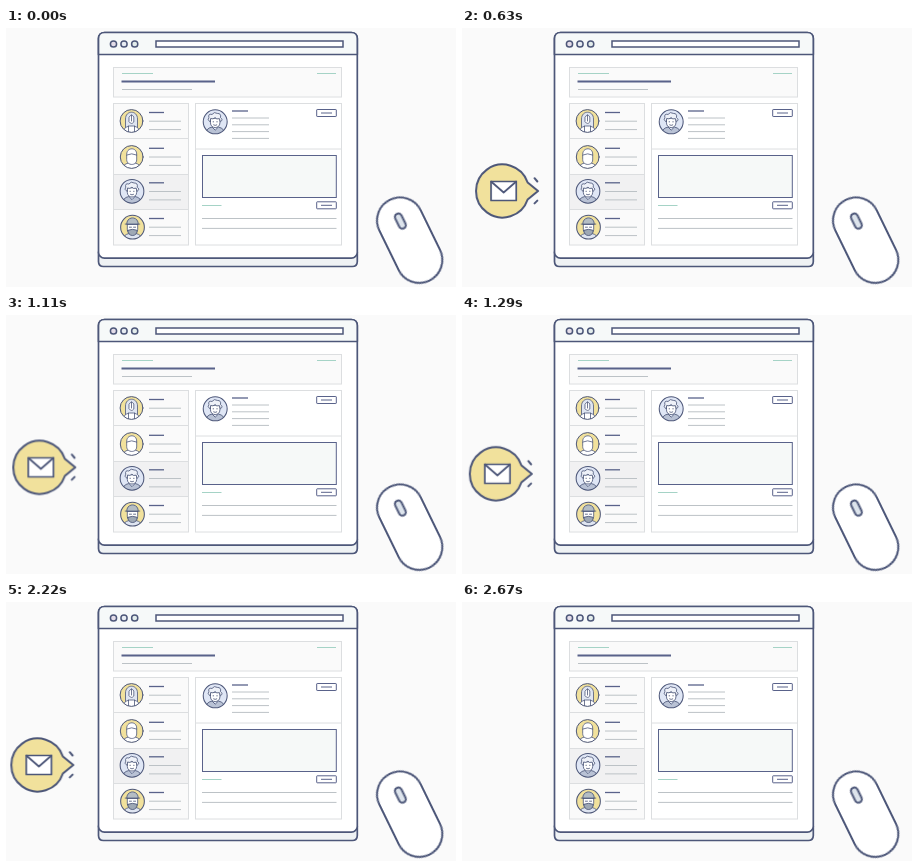
Write an HTML page that moves like this. It is 450 px wide and 259 px high and loops after 3.6 s.

```html
<!DOCTYPE html>
<html lang="en">
<head>
<meta charset="utf-8">
<title>Mail from the browser</title>
<style>
  html, body { margin: 0; width: 100%; height: 100%; overflow: hidden; background: #fafafa; }
  svg { display: block; width: 100%; height: 100%; }
  .ink { stroke: #4d5779; stroke-linecap: round; stroke-linejoin: round; }
  .edge { stroke: #dcdee0; stroke-width: 1; }
  .dark { stroke: #59628a; }
  .grey { stroke: #bcc2c6; }
  .green { stroke: #a5d3c6; }
</style>
</head>
<body>
<svg viewBox="0 0 450 259" fill="none">
  <defs>
    <clipPath id="disc"><circle r="11.4"/></clipPath>

    <g id="longHair" class="ink" stroke-width=".8">
      <path d="M-6 12V-2C-6-11 6-11 6-2V12Z" fill="#dfe5f1"/>
      <path d="M-10 13Q-8 6-2 5H2Q8 6 10 13Z" fill="#fff"/>
      <path d="M-2.3-4Q0-8 2.3-4V1Q0 4-2.3 1Z" fill="#fff"/>
      <path d="M0-6V0M-3 5V11M3 5V11"/>
    </g>

    <g id="bald" class="ink" stroke-width=".8">
      <path d="M-10 13Q-9 7-3 6H3Q9 7 10 13Z" fill="#fff"/>
      <path d="M-5-3C-5-10 5-10 5-3V3C5 9-5 9-5 3Z" fill="#fff"/>
      <path d="M-5-2Q0-4.500 5-2"/>
    </g>

    <g id="curly" class="ink" stroke-width=".8">
      <path d="M-10 13Q-9 6-3 5L0 8 3 5Q9 6 10 13Z" fill="#b9c2d5"/>
      <path d="M-4.500-3V1C-4.500 7 4.500 7 4.500 1V-3Z" fill="#fff"/>
      <path d="M-5 0Q-8-2-6-4Q-7-8-3-7Q-1-10 2-8Q6-8 5-4Q8-2 5 0L4-3Q1-2 0-4Q-2-2-4-3Z" fill="#eef1f8"/>
      <path d="M-2 0H-1.500M1.500 0H2M-1.500 3Q0 4 1.500 3"/>
    </g>

    <g id="hat" class="ink" stroke-width=".8">
      <path d="M-10 13Q-9 7-3 6H3Q9 7 10 13Z" fill="#dfe5f1"/>
      <path d="M-5-3V2C-5 9 5 9 5 2V-3Z" fill="#fff"/>
      <path d="M-5.500-3C-6-11 6-11 5.500-3Z" fill="#b4bdc4"/>
      <path d="M-7-3H7"/>
      <path d="M-4.500 3Q0 1 4.500 3Q4 8 0 8Q-4 8-4.500 3Z" fill="#9ea8b5"/>
      <path d="M-3 0H-1M1 0H3"/>
    </g>
  </defs>

  <g id="slide"><g id="hop" class="ink" stroke-width="2">
    <path d="M58.600 154.500L69 163 58.600 171.500A26.500 26.500 0 1 1 58.600 154.500Z" fill="#f1e19c"/>
    <rect x="22" y="153.500" width="25.200" height="19" fill="#fff" stroke-width="1.700"/>
    <path d="M22 153.500L34.600 164.500 47.200 153.500" stroke-width="1.700"/>
    <path d="M65.500 150.200L68.300 153.500M68.300 172.600L65.500 175.400"/>
  </g></g>

  <g class="ink" stroke-width="1.700">
    <path d="M92.500 224V233.500Q92.500 238.500 97.500 238.500H346.300Q351.300 238.500 351.300 233.500V224Z" fill="#eff2f4"/>
    <rect x="92.500" y="4.500" width="258.800" height="225.700" rx="6" fill="#fff"/>
    <path d="M92.500 26.500V10.500Q92.500 4.500 98.500 4.500H345.300Q351.300 4.500 351.300 10.500V26.500Z" fill="#f6f9f9"/>
    <circle cx="107.500" cy="16" r="3.100" fill="#e4dde9" stroke-width="1.500"/>
    <circle cx="118" cy="16" r="3.100" fill="#e8edf3" stroke-width="1.500"/>
    <circle cx="128.700" cy="16" r="3.100" fill="#e3edec" stroke-width="1.500"/>
    <rect x="150" y="13" width="187" height="6" fill="#fff" stroke-width="1.500" stroke-linejoin="miter"/>
  </g>

  <g class="edge">
    <rect x="107.500" y="39.500" width="228" height="29.500" fill="#fafafa"/>
    <rect x="107.500" y="75.500" width="75" height="141.500" fill="#fafafa"/>
    <rect x="107.500" y="146.500" width="75" height="35" fill="#f1f1f2"/>
    <path d="M107.500 110.500H182.500"/>
    <rect x="189.500" y="75.500" width="146" height="141.500" fill="#fff"/>
    <path d="M189.500 121H335.500"/>
  </g>
  <g class="dark">
    <rect x="196.500" y="127.500" width="133.800" height="42" fill="#f6f9f8"/>
    <rect x="310.700" y="81.500" width="19.600" height="7" rx=".5" fill="#fff"/>
    <rect x="310.700" y="173.800" width="19.600" height="7" rx=".5" fill="#fff"/>
  </g>
  <g id="lines"></g>
  <g id="people"></g>

  <g id="mouse"><g class="ink" stroke-width="2" transform="translate(403.700 212.200) rotate(-26)">
    <rect x="-23" y="-45" width="46" height="90" rx="23" fill="#fff"/>
    <rect x="-3.500" y="-29.200" width="7" height="16" rx="3.500" fill="#dde4ec"/>
  </g></g>
</svg>
<script>
  const LOOP = 3600;
  const byId = id => document.getElementById(id);

  function add(parent, tag, attrs) {
    const el = document.createElementNS('http://www.w3.org/2000/svg', tag);
    for (const key in attrs) el.setAttribute(key, attrs[key]);
    return parent.appendChild(el);
  }

  function line(kind, x1, x2, y, width = 1) {
    add(byId('lines'), 'path', { class: kind, d: `M${x1} ${y}H${x2}`, 'stroke-width': width });
  }

  function avatar(look, x, y, fill, size = 1) {
    const g = add(byId('people'), 'g', { transform: `translate(${x} ${y}) scale(${size})` });
    add(g, 'circle', { r: 11.4, fill });
    const clip = add(g, 'g', { 'clip-path': 'url(#disc)' });
    add(clip, 'use', { href: '#' + look });
    add(g, 'circle', { r: 11.4, class: 'ink', 'stroke-width': 1 });
  }

  line('green', 116, 147, 45.5);
  line('dark', 115.5, 209, 53.5, 2);
  line('grey', 116, 186, 61.5);
  line('green', 311, 330, 45.5);

  for (const y of [84.5, 120.3, 154.8, 190.5]) {
    line('dark', 143, 158, y, 1.3);
    line('grey', 143, 175, y + 8.7);
    line('grey', 143, 175, y + 17.1);
  }
  line('dark', 226, 242, 83, 1.3);
  for (const y of [90, 96.8, 103.6, 110.4]) line('grey', 226, 263, y);
  line('dark', 315, 326, 85);
  line('dark', 315, 326, 177.3);
  line('green', 196, 215.5, 177.5);
  line('grey', 196, 330.5, 190.5);
  line('grey', 196, 330.5, 200.4);

  const yellow = '#f1e19c', blue = '#dfe6f5';
  avatar('longHair', 125.5, 93, yellow);
  avatar('bald', 125.7, 129, yellow);
  avatar('curly', 126, 163.3, blue, 1.04);
  avatar('hat', 126.5, 199.2, yellow, 1.04);
  avatar('curly', 209.2, 93.8, blue, 1.05);

  const rise = 'cubic-bezier(.33,.67,.67,1)';
  const fall = 'cubic-bezier(.33,0,.67,.33)';
  const soft = 'cubic-bezier(.45,0,.55,1)';
  const dart = 'cubic-bezier(.32,0,.67,0)';

  // Each step: time in ms, offset in px, easing towards the next step.
  function move(id, axis, steps) {
    const frames = steps.map(([time, value, easing = 'linear']) => ({
      offset: time / LOOP,
      transform: `translate${axis}(${value}px)`,
      easing
    }));
    byId(id).animate(frames, { duration: LOOP, iterations: Infinity });
  }

  move('mouse', 'Y', [
    [0, 0, soft], [180, -9.5], [420, -9.5, soft], [570, 0], [LOOP, 0]
  ]);
  move('slide', 'X', [
    [0, 90], [450, 90, 'cubic-bezier(.3,.3,.5,1)'], [720, -4, soft], [930, -.3, soft],
    [1290, .8, soft], [1860, 0, soft], [2070, 0, soft],
    [2490, -6.5], [2520, -6.5, dart], [2670, 90], [LOOP, 90]
  ]);
  move('hop', 'Y', [
    [0, 0], [960, 0, rise], [1145, -11, fall], [1330, 0, rise],
    [1415, -2.3, fall], [1500, 0], [LOOP, 0]
  ]);
</script>
</body>
</html>
```
